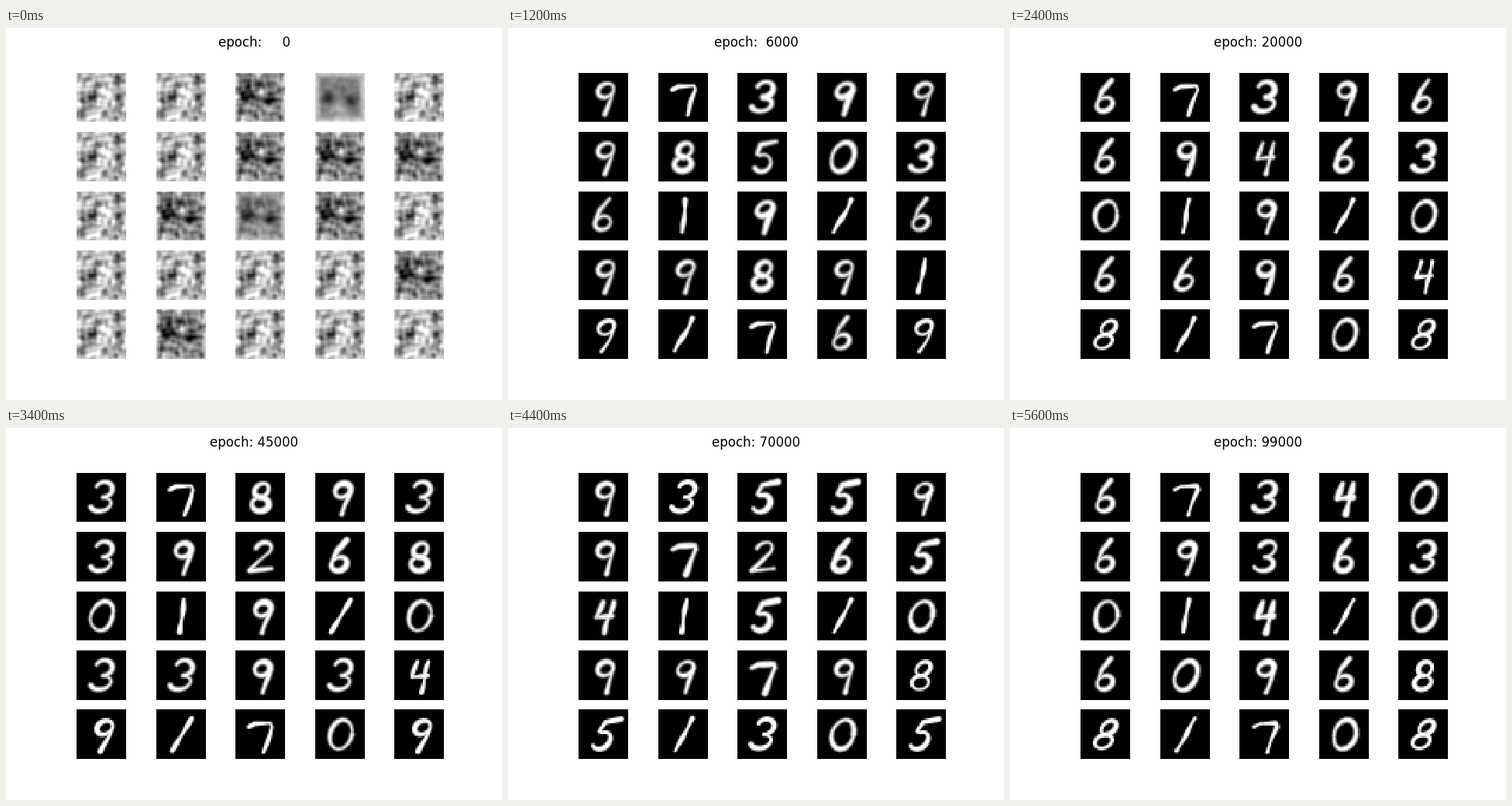
These frames come from a looping animation (640x480 px, 5.8 s). A matplotlib script:

```python
import matplotlib.pyplot as plt
import numpy as np
from matplotlib.animation import FuncAnimation

plt.rcParams["text.kerning_factor"] = 6

N = 28
YY, XX = np.mgrid[:N, :N] + 0.5
EPOCHS = [*range(0, 10001, 1000), *range(15000, 95001, 5000), 99000]

# Cells with the same letter show the same sample
LAYOUT = "abcde" "afghc" "ijdkn" "aefal" "mkbnm"
GROUPS = "abcdefghijklmn"

# Digit drawn by each group, from a to n, around an epoch
DIGITS = {
    2000: "04800388011840",
    6000: "97399850611196",
    20000: "67396946011480",
    45000: "37893926011490",
    70000: "93559726411850",
    99000: "67340936011880",
}
LEAN = {"j": 0.15, "k": 0.55, "m": 0.4}
CRISP, HEAVY, DARK = "bjklm", "cdfh", "cghjkl"


def arc(cx, cy, rx, ry, start, end):
    t = np.radians(np.linspace(start, end, 20))
    return np.c_[cx + rx * np.cos(t), cy + ry * np.sin(t)]


def path(*parts):
    """Join points and arcs into one evenly sampled line."""
    p = np.vstack(parts)
    length = np.r_[0, np.cumsum(np.hypot(*np.diff(p, axis=0).T))]
    s = np.linspace(0, length[-1], 70)
    return np.c_[np.interp(s, length, p[:, 0]), np.interp(s, length, p[:, 1])]


# Pen strokes in a box from -1 to 1, y down
GLYPHS = {
    "0": [path(arc(0, 0, .72, .95, 0, 360))],
    "1": [path((0, -1.05), (0, 1.05))],
    "2": [path(arc(0, -.5, .5, .45, 190, 390), (-.6, .9), (.85, .75))],
    "3": [path(arc(0, -.5, .55, .5, 205, 450), arc(0, .45, .65, .45, -90, 155))],
    "4": [path((-.3, -.9), (-.5, .1), (.5, 0)), path((.4, -.9), (.25, 1.1))],
    "5": [path((.7, -1), (-.25, -.8), (-.4, -.2), arc(0, .4, .55, .55, -110, 145))],
    "6": [path((.1, -1.1), (-.35, -.4), arc(0, .45, .5, .45, 180, 540))],
    "7": [path((-.85, -.5), (-.5, -.7), (.5, -.75), (.65, -.5), (.5, .3), (.4, 1.15))],
    "8": [path(arc(0, -.45, .45, .45, 90, 450), arc(0, .45, .55, .45, -90, 270))],
    "9": [path(arc(0, -.45, .5, .45, 0, 360), (.45, .2), (.3, 1.1))],
}


def bump(x, y, r):
    return np.exp(-((XX - x)**2 + (YY - y)**2) / (2 * r * r))


def smear(a, axis, times):
    for _ in range(times):
        a = (np.roll(a, 1, axis) + 2 * a + np.roll(a, -1, axis)) / 4
    return a


def weave(seed):
    """Noise streaked along rows and columns."""
    rng = np.random.default_rng(seed)
    rows, cols = rng.normal(size=(2, N, N))
    a = smear(smear(rows, 1, 5), 0, 1) + smear(smear(cols, 0, 5), 1, 1)
    return a / a.std()


def untrained():
    border = np.minimum(np.minimum(XX, N - XX), np.minimum(YY, N - YY))
    inside = np.clip(border / 4, 0, 1)
    eyes = bump(8, 15, 2.5) + bump(20, 16, 2.5)
    light = .78 - .16 * inside + .15 * weave(4) - .4 * bump(8, 14, 2) + .25 * bump(16, 14, 4)
    dark = .74 - .34 * inside + .14 * weave(9) - .25 * eyes + .3 * bump(18, 22, 3)
    soft = .85 - .35 * inside - .35 * eyes + .2 * bump(14, 20, 4) + .03 * weave(2)
    cells = []
    for i, g in enumerate(LAYOUT):
        if g == "d":
            cells.append(soft + (dark - soft) * (i // 5) / 4)
        else:
            cells.append(dark if g in DARK else light)
    return np.clip(cells, 0, 1)


def draw(digit, g, epoch):
    rng = np.random.default_rng([epoch, ord(g)])
    bend, thick, swing = rng.uniform(-1, 1, 3)
    phase = rng.uniform(0, 2 * np.pi)
    soft = (1 if g in CRISP else 1.6) * (1 + 1200 / epoch)
    weight = (2.9 if g in HEAVY else 2.3) + .25 * thick
    lean = LEAN.get(g, .2) + .06 * swing
    img = np.zeros((N, N))
    for x, y in (s.T for s in GLYPHS[digit]):
        px = 14.5 + 8.7 * (x - lean * y) + .5 * bend * np.sin(3 * y + phase)
        py = 14.2 + 8.7 * y
        # The pen presses harder in some places
        press = weight * (1 + .25 * np.sin(np.linspace(0, 9, len(x)) + phase))
        reach = press / 2 - np.hypot(XX[..., None] - px, YY[..., None] - py)
        img = np.maximum(img, reach.max(-1) / soft + .5)
    return np.clip(img, 0, 1)


def trained(epoch):
    digits = DIGITS[min(DIGITS, key=lambda e: abs(e - epoch))]
    samples = {g: draw(d, g, epoch) for g, d in zip(GROUPS, digits)}
    return [samples[g] for g in LAYOUT]


sheets = [trained(e) if e else untrained() for e in EPOCHS]

fig, axes = plt.subplots(5, 5, figsize=(6.4, 4.8), dpi=100)
title = fig.suptitle("")
views = []
for ax in axes.flat:
    ax.axis("off")
    views.append(ax.imshow(np.zeros((N, N)), cmap="gray", vmin=0, vmax=1,
                           interpolation="nearest"))


def update(i):
    title.set_text(f"epoch: {EPOCHS[i]:5d}")
    for view, cell in zip(views, sheets[i]):
        view.set_data(cell)
    return [title, *views]


anim = FuncAnimation(fig, update, frames=len(EPOCHS), interval=200, repeat=True, repeat_delay=0)
plt.show()
```
